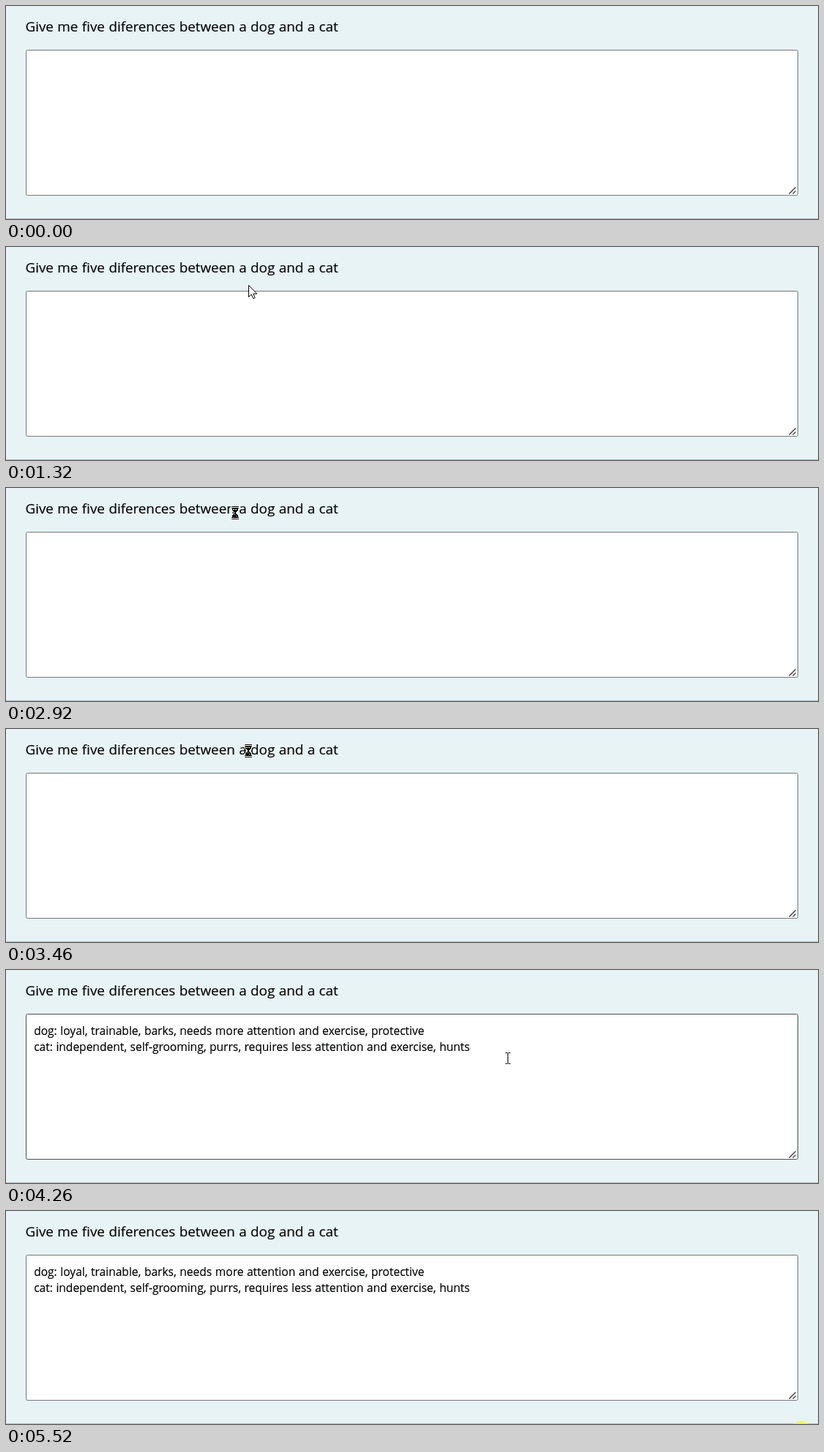
Animation, 1109 px wide and 292 px high, one loop 5.65 s. Source, as an HTML page:

```html
<!DOCTYPE html>
<html lang="en">
<head>
<meta charset="utf-8">
<title>Question form</title>
<style>
  html, body { margin: 0; width: 100%; height: 100%; overflow: hidden; background: #e7f3f5; }
  svg { display: block; width: 100vw; height: 100vh; }
  text {
    font-family: "Open Sans", "Noto Sans", sans-serif;
    word-spacing: .032em;
    fill: #060808;
    stroke: #060808;
    stroke-width: .2px;
  }
  .title { font-size: 18.8px; }
  .answer { font-size: 15.56px; }
  .crisp { shape-rendering: crispEdges; }
  #box { fill: #fff; stroke: #767676; }
  #box.hover { stroke: #4f4f4f; }
  .off { display: none; }
</style>
</head>
<body>
<svg viewBox="0 0 1109 292">
  <rect width="1109" height="292" fill="#e7f3f5"/>
  <rect y="291" width="1109" height="1" fill="#b3c1c4"/>
  <text class="title" x="26.5" y="35">Give me five diferences between a dog and a cat</text>
  <rect id="box" x="27.5" y="60.5" width="1054" height="199" rx="2"/>
  <path d="M1069.5 257.5l9-9M1074.5 257.5l4-4" stroke="#505050" stroke-width="1.6"/>
  <g id="answer" class="answer">
    <text x="38.2" y="89">dog: loyal, trainable, barks, needs more attention and exercise, protective</text>
    <text x="38.2" y="111">cat: independent, self-grooming, purrs, requires less attention and exercise, hunts</text>
  </g>
  <g id="cursor">
    <circle id="halo" cx="-.5" r="15" fill="#ff0" fill-opacity=".6"/>
    <path id="arrow" d="M.5.5v16l3.7-3.5 2.5 5.6 2.4-1-2.4-5.5h5z" fill="#fff" stroke="#000"/>
    <path id="beam" class="crisp" d="M-3-8h3v1h1v-1h3v1h-3v14h3v1h-3v-1h-1v1h-3v-1h3v-14h-3z"/>
    <g id="wait" class="crisp">
      <path d="M-6-10h12v4h-1v3l-3 3 3 3v3h1v4h-12v-4h1v-3l3-3-3-3v-3h-1z" fill="#fff"/>
      <path d="M-5-9h10v1h-10zM-5-7h10v1h-1v2l-3 4 3 4v2h1v1h-10v-1h1v-2l3-4-3-4v-2h-1zM-5 8h10v1h-10z"/>
      <path d="M-3-5h2v1h-2zM0-5h2v1h-2zM-1 2h1v1h-1zM1 4h1v1h-1z" fill="#fff"/>
    </g>
  </g>
</svg>
<script>
  const LOOP = 5650, STEP = 66;
  const $ = id => document.getElementById(id);
  const show = (id, on) => $(id).classList.toggle("off", !on);
  const within = (v, a, b) => v >= a && v < b;

  // Each stroke of the mouse is one curve, sampled every STEP ms; it holds its end
  const outside = [1086, 303], inBox = [433, 117], onTitle = [313, 34], boxEdge = [423, 62];
  const moves = [
    { start: 264, steps: 9, curve: [outside, [600, 165], inBox] },
    { start: 858, steps: 10, curve: [inBox, [330, 60], onTitle] },
    { start: 3262, steps: 10, curve: [onTitle, [332, 19], boxEdge] },
    { start: 3922, steps: 15, curve: [boxEdge, [846, 135], outside] }
  ];

  function locate(t) {
    const { start, steps, curve: [a, b, c] } = moves.findLast(m => m.start <= t) || moves[0];
    const done = Math.floor((t - start) / STEP);
    const u = Math.min(1, Math.max(0, done / steps)), v = 1 - u;
    return [0, 1].map(i => Math.round(v * v * a[i] + 2 * u * v * b[i] + u * u * c[i]));
  }

  function shape(t, x, y) {
    if (within(t, 1780, 3526)) return "wait";
    const overTitle = within(y, 20, 39) && x < 455;
    const overBox = within(y, 60, 261) && within(x, 27, 1082);
    return overTitle || overBox ? "beam" : "arrow";
  }

  function draw(now) {
    const t = now % LOOP;
    const [x, y] = locate(t);
    const kind = shape(t, x, y);
    $("cursor").setAttribute("transform", `translate(${x} ${y})`);
    for (const id of ["arrow", "beam", "wait"]) show(id, id === kind);
    show("halo", within(t, 1520, 1650) || t >= 5520);
    show("answer", t >= 3590);
    $("box").classList.toggle("hover", kind === "beam" && y > 63);
    requestAnimationFrame(draw);
  }
  draw(performance.now());
</script>
</body>
</html>
```
